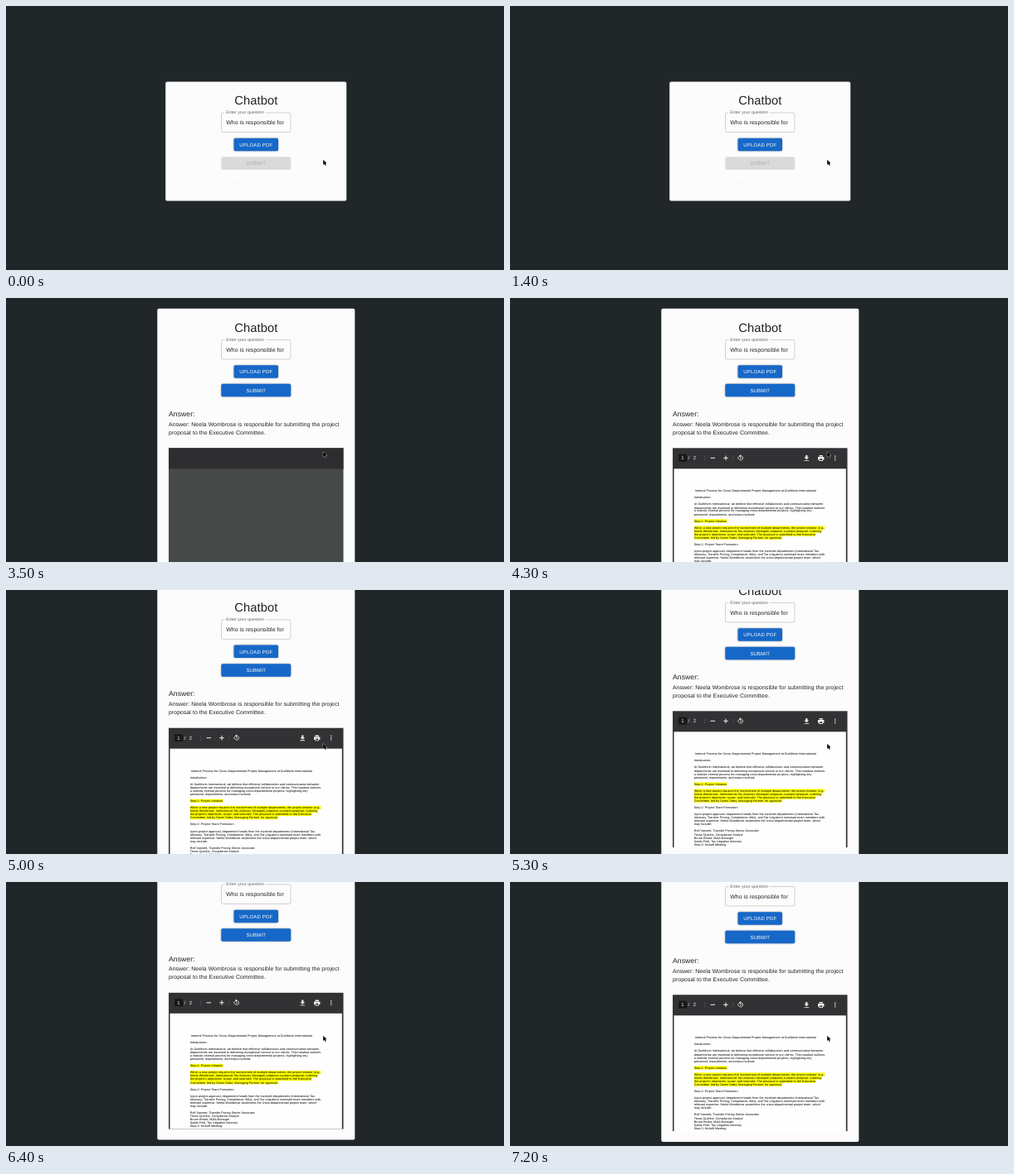
Animation, 600 px wide and 319 px high, one loop 7.3 s. Source, as an HTML page:

```html
<!DOCTYPE html>
<html lang="en">
<head>
<meta charset="utf-8">
<title>Chatbot</title>
<style>
  html, body { margin: 0; width: 100%; height: 100%; overflow: hidden; background: #212629; }
  svg { display: block; width: 600px; height: 319px; }
  text, pre { font-family: "Liberation Sans", Arial, sans-serif; text-rendering: geometricPrecision; }
  text { fill: #212121; }
  .body { font-size: 6.9px; letter-spacing: .065px; }
  .button { font-size: 6.03px; letter-spacing: .172px; text-anchor: middle; fill: #fff; }
  .shadow { filter: drop-shadow(0 .9px .8px rgba(0, 0, 0, .35)); }
  .icon { fill: none; stroke: #f1f1f1; stroke-width: 1; }
  .solid, .page { fill: #f1f1f1; }
  .page { font-size: 6px; }
  pre { margin: 0; font-size: 37.5px; line-height: 40.56px; color: #000; }
  mark { background: #ff0; color: inherit; }
</style>
</head>
<body>
<svg viewBox="0 0 600 319">
  <g id="content">
    <rect id="card" rx="2" fill="#fcfcfc"/>

    <g id="form">
      <text x="301.4" y="40.8" font-size="14.7" letter-spacing=".1" text-anchor="middle">Chatbot</text>
      <path d="M263.5 50.5H261.5a2 2 0 0 0-2 2V72a2 2 0 0 0 2 2H341a2 2 0 0 0 2-2V52.500a2 2 0 0 0-2-2H313" fill="none" stroke="#bdbdbd" stroke-width=".7"/>
      <text x="265.200" y="51.700" font-size="5.17" letter-spacing=".048" style="fill:#666">Enter your question</text>
      <text class="body" x="265.200" y="64.500">Who is responsible for</text>
      <rect class="shadow" x="274.500" y="81.200" width="53.500" height="15.500" rx="1.700" fill="#1668c8"/>
      <text class="button" x="301.300" y="91.200">UPLOAD PDF</text>
      <rect id="submit" x="259.300" y="103.800" width="83.900" height="15.500" rx="1.700"/>
      <text id="submitLabel" class="button" x="301.300" y="113.700">SUBMIT</text>
    </g>

    <g id="spinner" fill="none" stroke="#1976d2" stroke-width="3.600">
      <circle id="arc" r="20.200"/>
    </g>

    <g id="answer">
      <text x="196" y="143" font-size="8.620" letter-spacing=".065">Answer:</text>
      <text class="body" x="196" y="154.500">Answer: Neela Wombrose is responsible for submitting the project</text>
      <text class="body" x="196" y="164.800">proposal to the Executive Committee.</text>
    </g>

    <g id="viewer">
      <rect x="196" y="181.300" width="210.500" height="164.700" fill="#454a49"/>
      <rect x="196" y="205.500" width="210.500" height="1.500" fill="#38393b"/>
      <rect x="196" y="181.300" width="210.500" height="24.500" fill="#2d2d30"/>
    </g>

    <g id="pdf">
      <rect x="196" y="181.300" width="210.500" height="164.700" fill="#323235"/>
      <rect x="197.500" y="206.300" width="207.300" height="139.700" fill="#fefefe"/>
      <rect x="203" y="188.700" width="10" height="9" fill="#18181a"/>
      <text class="page" x="206.300" y="195.400">1</text>
      <text class="page" x="214.800" y="195.400">/</text>
      <text class="page" x="220.800" y="195.400">2</text>
      <path class="icon" style="stroke:#66666a;stroke-width:.500" d="M234.700 190v6.500M268.700 190v6.500"/>
      <path class="icon" d="M241.500 193.300h5.600M257.200 193.300h5.600M260 190.500v5.600"/>
      <path class="icon" style="stroke-width:.800" d="M277 190.700a2.800 2.800 0 1 1 .500 5.500M274.300 193.300l2.200-2.200 2.200 2.200-2.200 2.200z"/>
      <path class="solid" d="M276.200 190.700l1.800-1.600v3.200z"/>
      <path class="solid" d="M356.200 190h2.200v2.500h1.700l-2.800 2.800-2.800-2.800h1.700zM354.500 195.900h5.600v.900h-5.600z"/>
      <path class="solid" d="M372.500 190.100h4.400v1.400h-4.400zM371 192h7.400v3.400h-1.500v1.500h-4.400v-1.500h-1.500z"/>
      <rect x="373.300" y="194.200" width="2.800" height="1.900" fill="#323235"/>
      <path class="solid" d="M391 190.400h1.300v1.300h-1.300zM391 192.700h1.300v1.300h-1.300zM391 195h1.300v1.300h-1.300z"/>
      <foreignObject width="1800" height="1150" transform="translate(221.800 230.900) scale(.1)"><pre> Internal Process for Cross-Departmental Project Management at DueMorin International

Introduction:

At DueMorin International, we believe that effective collaboration and communication between
departments are essential to delivering exceptional service to our clients. This handout outlines
a realistic internal process for managing cross-departmental projects, highlighting key
personnel, departments, and steps involved.

<mark>Step 1: Project Initiation</mark>

<mark>When a new project requires the involvement of multiple departments, the project initiator (e.g.,
Neela Wombrose, International Tax Advisory Manager) prepares a project proposal, outlining
the project's objectives, scope, and rationale. The proposal is submitted to the Executive
Committee, led by Owen Tarbo, Managing Partner, for approval.</mark>

Step 2: Project Team Formation

Upon project approval, department heads from the involved departments (International Tax
Advisory, Transfer Pricing, Compliance, M&amp;A, and Tax Litigation) nominate team members with
relevant expertise. Neela Wombrose assembles the cross-departmental project team, which
may include:

Rolf Vannert, Transfer Pricing Senior Associate
Tessa Quimlor, Compliance Analyst
Bruno Heskit, M&amp;A Manager
Nadia Frolt, Tax Litigation Attorney
Step 3: Kickoff Meeting</pre></foreignObject>
    </g>
  </g>

  <path transform="translate(382.200 185.700)" d="M0 0V6.200L1.400 5 2.400 7.300 3.500 6.800 2.500 4.600H4.400Z" fill="#000" stroke="#fff" stroke-width=".600" paint-order="stroke"/>
</svg>

<script>
const LOOP = 7300, STEP = 100;
const ANSWERED = 2000, ENABLED = 2800, LOADED = 3700;
const SCROLL = [[4750, 0], [4800, 1], [5300, 35], [5600, 44.5], [5900, 47.5], [6500, 47.5], [7000, 45]];

const $ = id => document.getElementById(id);
const set = (id, attrs) => Object.entries(attrs).forEach(([k, v]) => $(id).setAttribute(k, v));
const show = (id, visible) => { $(id).style.display = visible ? '' : 'none'; };
const ease = x => (1 - Math.cos(Math.PI * x)) / 2;

function scrollAt(t) {
  let [t0, y0] = SCROLL[0];
  for (const [t1, y1] of SCROLL) {
    if (t < t1) return t < t0 ? y0 : y0 + (y1 - y0) * (t - t0) / (t1 - t0);
    [t0, y0] = [t1, y1];
  }
  return y0;
}

function drawSpinner(t) {
  const p = t / 1400 % 1;
  const grow = ease(Math.min(1, p * 2)), slide = ease(Math.max(0, p * 2 - 1));
  set('spinner', { transform: `translate(267.600 213.700) scale(.391) rotate(${360 * p})` });
  set('arc', { 'stroke-dasharray': `${1 + 99 * grow} 200`, 'stroke-dashoffset': -15 * grow - 110 * slide });
}

function draw(t) {
  const answered = t >= ANSWERED, enabled = t >= ENABLED;
  set('content', { transform: `translate(0 ${-scrollAt(t)})` });
  set('card', answered
    ? { x: 182.3, y: 12.8, width: 238, height: 346.2 }
    : { x: 192.2, y: 91.4, width: 218, height: 144.2 });
  set('form', { transform: `translate(0 ${answered ? 0 : 78.5})` });
  set('submit', { fill: enabled ? '#1668c8' : '#dadada', class: enabled ? 'shadow' : '' });
  $('submitLabel').style.fill = enabled ? '#fff' : '#acacac';
  show('spinner', !answered);
  show('answer', answered);
  show('viewer', enabled && t < LOADED);
  show('pdf', t >= LOADED);
  drawSpinner(t);
}

const start = performance.now();
function frame() {
  const t = (performance.now() - start) % LOOP;
  draw(Math.floor(t / STEP) * STEP);
  requestAnimationFrame(frame);
}
frame();
</script>
</body>
</html>
```
